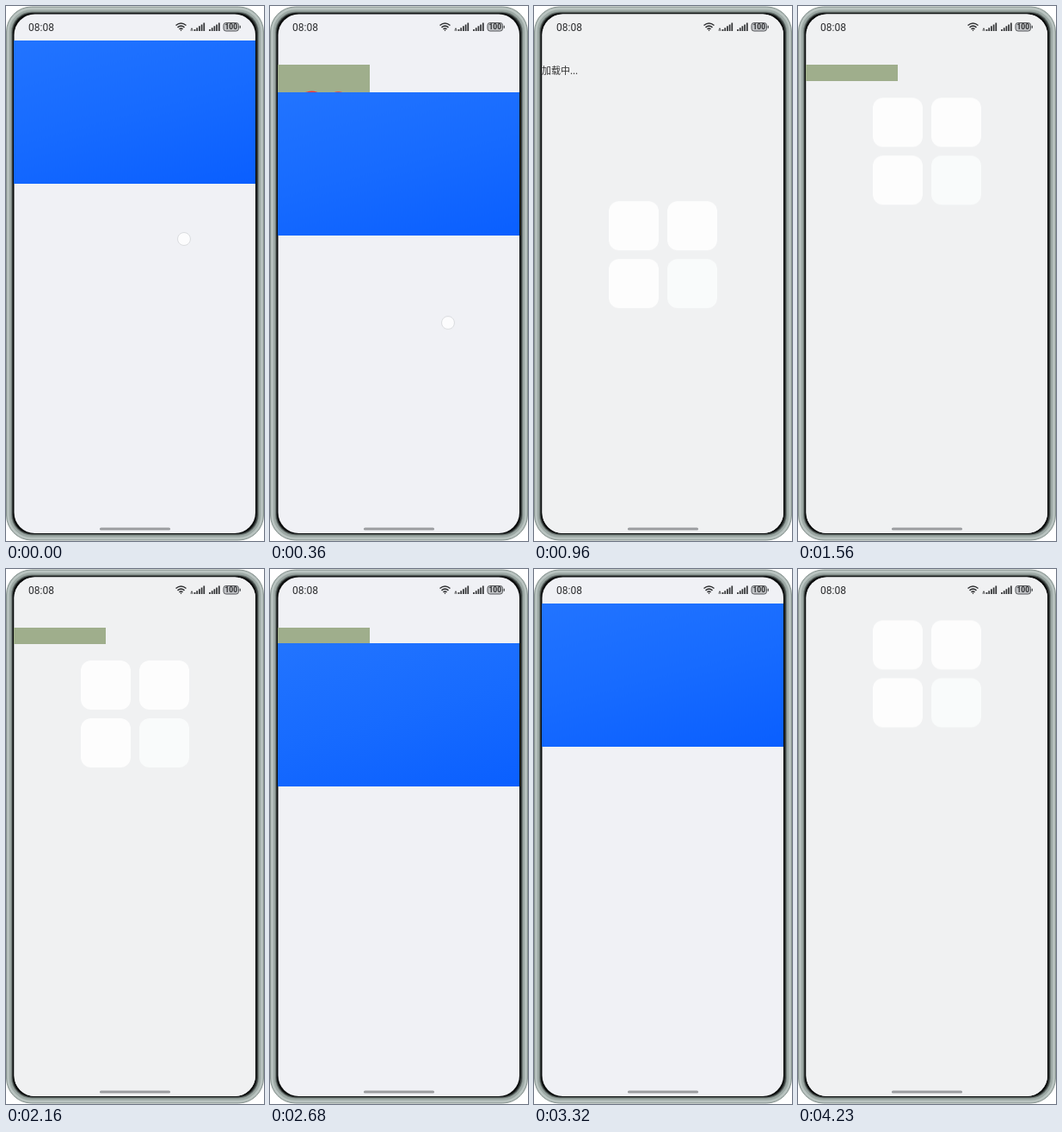
Animation of 300 by 620 pixels, one loop 4.39 s. Source, as an HTML page:

```html
<!DOCTYPE html>
<html lang="zh">
<head>
<meta charset="utf-8">
<title>Pull to refresh</title>
<style>
@property --pull { syntax: "<length>"; inherits: true; initial-value: 0px; }
html, body { margin: 0; width: 100%; height: 100%; overflow: hidden; background: #fff; }
#stage { position: relative; width: 300px; height: 620px; overflow: hidden; }
#stage > svg { position: absolute; left: 0; top: 0; }
#screen { position: absolute; inset: 0; background: #f0f1f5;
  clip-path: inset(9.5px 10px 9px 9.5px round 24px); }
#screen div, #screen svg { position: absolute; }
#header { left: 9px; top: 68px; width: 107px; overflow: hidden;
  height: max(0px, calc(var(--pull) - 28px)); }
#heart, #loading { left: 0; top: 0; }
#loading { font: 11px/13px "Noto Sans CJK SC", "Noto Sans CJK", sans-serif;
  color: #333; white-space: nowrap; }
.card { left: 9px; top: 40px; width: 282px; height: 166px;
  transform: translateY(calc(var(--pull) - .5px)); }
#blue { background: linear-gradient(165deg, #2274ff, #176bff 50%, #0a5fff); }
#tint { inset: 0; background: #f0f1f2; }
.tile { width: 58px; height: 57px; border-radius: 12px; background: #fdfdfd; }
#dot { left: 199px; top: 262px; width: 14px; height: 14px; border: 1px solid #d9dbde;
  border-radius: 50%; background: #fcfcfd; transform: translateY(calc(var(--pull) * 1.6)); }
</style>
</head>
<body>
<div id="stage">
  <svg width="300" height="620" fill="none">
    <rect x=".5" y="1" width="299" height="618" rx="29" fill="#9ca8a4" stroke="#87938f"/>
    <rect x="2.500" y="3" width="295" height="614" rx="27" stroke="#bac4c1" stroke-width="2.500"/>
    <rect x="6" y="6.500" width="288" height="607" rx="24" fill="#727c79"/>
    <rect x="7" y="7.500" width="286" height="605" rx="23" fill="#3a403f"/>
    <rect x="8" y="8.300" width="283.500" height="603.500" rx="22.500" fill="#0a0c0c"/>
  </svg>
  <div id="screen">
    <div id="tint"></div>
    <div id="header">
      <svg id="heart" width="107" height="106" viewBox="9 68 107 106" fill="none" stroke-linecap="round">
        <path d="M9 68h107v106H9z" fill="#9fae8c"/>
        <path d="M62.500 108C59 101 51 98 44 100C36 101 32 107 34 115C36 125 39 131 43 137C48 145 56 149 62 153.500C69 150 75 143 81 136C87 127 93 116 91.500 108C89 100 80 99 74 101C69 103 66 106 62.500 108Z"
          fill="#ffb4b8" stroke="#ee343d" stroke-width="1.700"/>
        <path d="M55 119Q63 128.500 72 119" stroke="#e0303a" stroke-width="1.300"/>
        <path d="M53.300 115.500h.8M72.600 114.500h.8" stroke="#e0303a" stroke-width="2"/>
      </svg>
      <div id="loading">加载中...</div>
    </div>
    <div id="blue" class="card"></div>
    <div id="tiles" class="card">
      <div class="tile" style="left:78px;top:20px"></div>
      <div class="tile" style="left:146px;top:20px"></div>
      <div class="tile" style="left:78px;top:87px"></div>
      <div class="tile" style="left:146px;top:87px;background:#f9fbfb"></div>
    </div>
    <div id="dot"></div>
  </div>
  <svg width="300" height="620" fill="none">
    <text x="26" y="29" font-family="Roboto, sans-serif" font-size="12" fill="#2b2c2e">08:08</text>
    <g stroke="#2f3032" stroke-width="1.500">
      <path d="M197.500 22.500q6-5 12 0M199.500 24.800q4-3.300 8 0M201.500 26.900q2-1.700 4 0"/>
      <circle cx="203.500" cy="28.300" r=".8" fill="#2f3032" stroke="none"/>
      <path id="bars" stroke-width="1.700"/>
      <path d="M214.500 28h3M215 26.300h2" stroke-width="1.100"/>
    </g>
    <rect x="253" y="19.500" width="17.500" height="9.500" rx="2.800" fill="#c3c5c8" stroke="#55575a"/>
    <path d="M272.300 22.700v3" stroke="#55575a" stroke-width="1.400"/>
    <text x="261.800" y="27.400" text-anchor="middle" font-family="Roboto, sans-serif" font-size="8.500" font-weight="700" fill="#2b2c2e">100</text>
    <path d="M110.500 606h79" stroke="#9b9da0" stroke-width="3.200" stroke-linecap="round"/>
  </svg>
</div>
<script>
const LOOP = 4390;
const RELEASE = 880, TEXT_END = 1280, DONE = 2680, SWAP = 3740;
const start = document.timeline.currentTime ?? 0;
const $ = id => document.getElementById(id);

// steps: [time in ms, value, easing towards the next step]
function play(el, prop, steps) {
  const frames = steps.map(([t, value, easing = 'linear']) =>
    ({ offset: t / LOOP, [prop]: value, easing }));
  const anim = el.animate(frames, { duration: LOOP, iterations: Infinity });
  anim.startTime = start;
}

// Shows an element only inside the given [from, to] spans.
function show(id, ...spans) {
  const steps = [[0, 0]];
  for (const [from, to] of spans) steps.push([from, 0], [from, 1], [to, 1], [to, 0]);
  steps.push([LOOP, 0]);
  play($(id), 'opacity', steps);
}

play($('screen'), '--pull', [
  [0, '0px'],
  [40, '0px', 'cubic-bezier(.4,0,.75,.8)'],
  [600, '135.5px', 'cubic-bezier(.3,.45,.6,1)'],
  [860, '170px'],
  [RELEASE, '170px', 'cubic-bezier(.42,0,.4,1)'],
  [1600, '46.5px'],
  [DONE, '46.5px', 'cubic-bezier(.42,0,.44,1)'],
  [3320, '0px'],
  [LOOP, '0px']
]);

show('blue', [0, RELEASE], [DONE, SWAP]);
show('tiles', [RELEASE, DONE], [SWAP, LOOP]);
show('tint', [RELEASE, DONE], [SWAP, LOOP]);
show('heart', [0, RELEASE], [TEXT_END, LOOP]);
show('loading', [RELEASE, TEXT_END]);
show('dot', [40, RELEASE]);

const bars = (x, n, step) => Array.from({ length: n }, (_, i) =>
  `M${x + i * step} 29v${-2 - i * 7.5 / (n - 1)}`).join('');
$('bars').setAttribute('d', bars(219.5, 5, 2.7) + bars(237, 5, 2.7));
</script>
</body>
</html>
```
